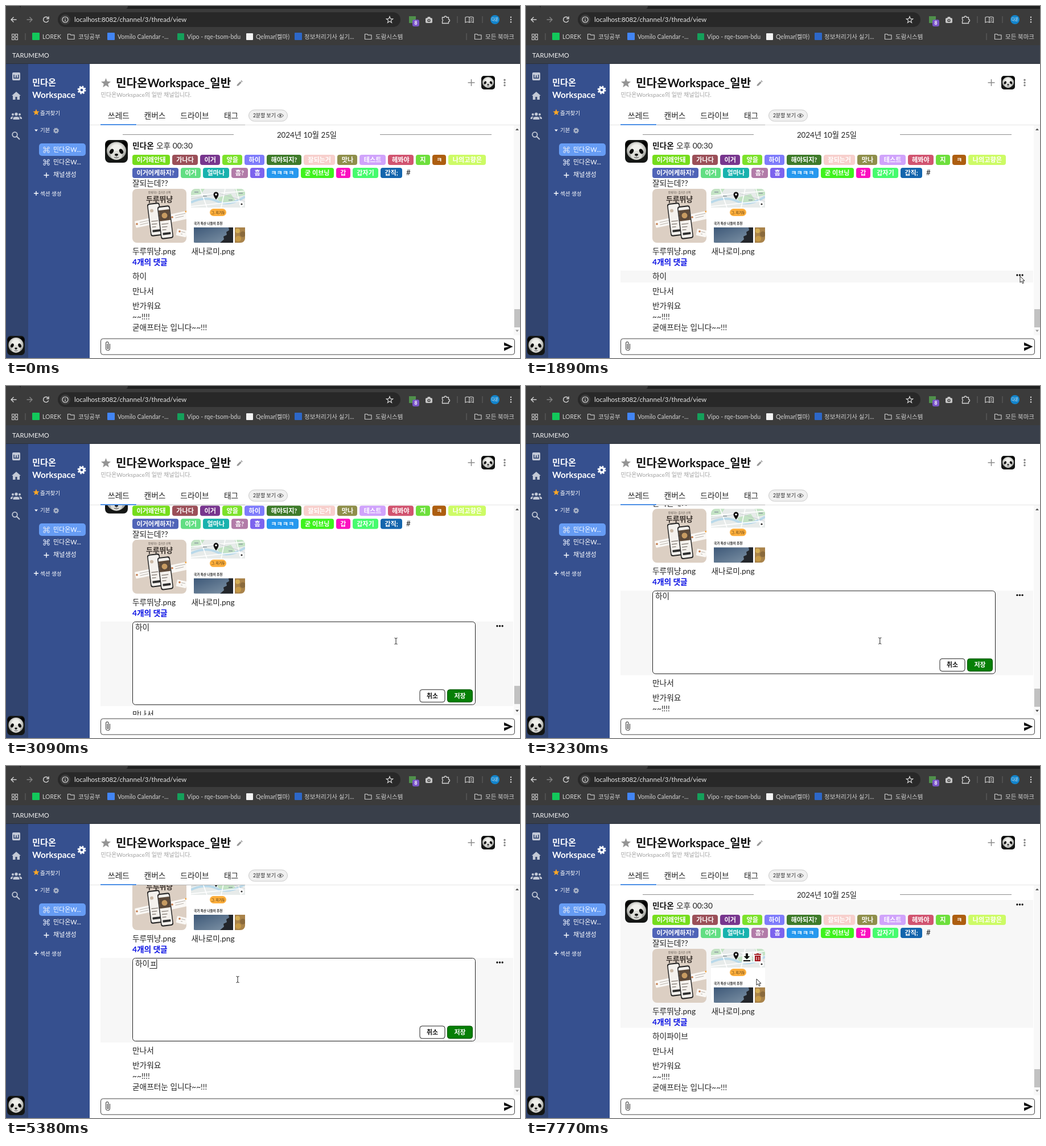
Write an HTML page that moves like this. It is 903 by 620 pixels and loops after 8000 ms.

```html
<!DOCTYPE html>
<html lang="ko">
<head>
<meta charset="utf-8">
<title>Thread edit</title>
<style>
html, body { margin: 0; width: 100%; height: 100%; overflow: hidden; background: #fff; }
svg { display: block; }
text { font-family: Lato, "Noto Sans CJK KR", "Noto Sans CJK", sans-serif; white-space: pre; }
.b { font-weight: 700; }
.m { text-anchor: middle; }
</style>
</head>
<body>
<svg id="stage" width="903" height="620" viewBox="0 0 903 620"></svg>
<script>
const LOOP = 8000;
const USER = '민다온';

// Drawing helpers: text is placed by its vertical centre
const T = (x, y, s, size, fill = '#222', cls = '') =>
  `<text x="${x}" y="${(y + size * .37).toFixed(2)}" font-size="${size}" fill="${fill}" class="${cls}">${s}</text>`;
const R = (x, y, w, h, fill, r = 0, more = '') =>
  `<rect x="${x}" y="${y}" width="${w}" height="${h}" rx="${r}" fill="${fill}" ${more}/>`;
const C = (x, y, r, fill, more = '') => `<circle cx="${x}" cy="${y}" r="${r}" fill="${fill}" ${more}/>`;
const L = (d, stroke, w = 1.3, more = '') =>
  `<path d="${d}" fill="none" stroke="${stroke}" stroke-width="${w}" ${more}/>`;
const F = (d, fill, more = '') => `<path d="${d}" fill="${fill}" ${more}/>`;
const G = (id, body, more = '') => `<g id="${id}" ${more}>${body}</g>`;

const plus = (x, y, r, c, w = 1.4) => L(`M${x - r} ${y}h${2 * r}M${x} ${y - r}v${2 * r}`, c, w);
const dots = (x, y, dx, dy, r, c) => [-1, 0, 1].map(i => C(x + i * dx, y + i * dy, r, c)).join('');
const folder = (x, y) => L(`M${x + .5} ${y - 4.5}h4l1.5 1.7h6v7.3h-11.5z`, '#c7c7c7', 1.2, 'stroke-linejoin="round"');

function star(x, y, r, fill, more) {
  let d = '';
  for (let i = 0; i < 10; i++) {
    const a = i * Math.PI / 5, q = i % 2 ? r * .43 : r;
    d += (i ? 'L' : 'M') + (x + q * Math.sin(a)).toFixed(2) + ' ' + (y - q * Math.cos(a)).toFixed(2);
  }
  return F(d + 'z', fill, more);
}

function gear(x, y, r, c) {
  const tooth = 2 * Math.PI * r / 16;
  return C(x, y, r * .65, 'none', `stroke="${c}" stroke-width="${r * .55}"`) +
    C(x, y, r, 'none', `stroke="${c}" stroke-width="${r * .42}" stroke-dasharray="${tooth}"`);
}

const oval = (x, y, rx, ry, turn, fill) =>
  `<ellipse rx="${rx}" ry="${ry}" fill="${fill}" transform="translate(${x} ${y}) rotate(${turn})"/>`;

const panda = (x, y, w, h = w) =>
  `<svg x="${x}" y="${y}" width="${w}" height="${h}" viewBox="0 0 40 40" preserveAspectRatio="none">` +
  R(0, 0, 40, 40, '#141615', 8) + oval(6, 8, 5, 5.5, 35, '#030303') + oval(34, 8, 5, 5.5, -35, '#030303') +
  oval(20, 19, 17, 15.5, 0, 'url(#fur)') + oval(20, 27, 10, 8, 0, '#dcdcd8') +
  oval(11.5, 20, 3.2, 4.6, 32, '#0c0c0c') + oval(28.5, 20, 3.2, 4.6, -32, '#0c0c0c') +
  oval(20, 26, 3, 1.9, 0, '#111') + L('M20 27v3M16 30.500q4 2 8 0', '#444', 1) + '</svg>';

function browser() {
  const ic = '#d5d5d5', bm = '#d0d0d0', z = 10.5;
  const bar = (x, y) => L(`M${x} ${y - 6}v12`, '#646464', 1);
  return R(0, 0, 903, 70, '#3b3b3b') + R(0, 0, 903, 5, '#1f2020') + F('M0 0h22q4 0 4 5H0zM210 5q4 0 4-5h-188v5z', '#3b3b3b') +
    L('M18.5 24H9M13.5 19.5L9 24l4.5 4.500', ic, 1.4) + L('M36.500 24H46M41.500 19.500L46 24l-4.500 4.500', '#858585', 1.4) +
    L('M74 21a4.700 4.700 0 1 0 .700 4.500M75 18.500v4h-4', ic, 1.4) +
    R(91, 11, 602, 26, '#282828', 13) + C(104, 24, 9, '#3c3c3c') + C(104, 24, 5, 'none', `stroke="${ic}" stroke-width="1.2"`) +
    L('M104 23.500v3.500M104 21v1.300', ic, 1.2) +
    T(120, 24, 'localhost:8082/channel/3/thread/view', 11.5, '#e6e6e6') +
    star(674, 24.5, 6, 'none', `stroke="${ic}" stroke-width="1.2"`) +
    R(708, 18, 12, 12, '#4f8f4b') + R(714, 24, 12, 12, '#7a55c7', 3) + T(720, 30, '8', 8.5, '#fff', 'b m') +
    R(737, 21, 12, 9, '#c4c4c4', 2) + R(740.5, 19, 5, 3, '#c4c4c4', 1) + C(743, 25.5, 2.6, '#3b3b3b') + C(743, 25.5, 1.2, '#c4c4c4') +
    L('M766.500 20h3.500a2 2 0 0 1 4 0h3.500v3.500a2 2 0 0 1 0 4v3h-11v-3.500a2 2 0 0 0 0-3.500z', ic, 1.3) +
    bar(793, 24) + L('M814 20q-3-2-7 0v9q4-2 7 0q3-2 7 0v-9q-4-2-7 0v9M816 22h3M816 25h3', ic, 1.2) + bar(837, 24) +
    C(859, 24, 8, '#1284cc') + T(859, 24, USER.slice(1), 6.5, '#fff', 'm') + dots(887, 24, 0, 4.2, 1.2, ic) +
    [0, 1, 2, 3].map(i => R(10.5 + i % 2 * 6, 49.5 + (i >> 1) * 6, 4, 4, 'none', 0, `stroke="${bm}"`)).join('') +
    bar(34, 54) + R(46, 47, 13, 13, '#12c75b', 1) + T(64, 54, 'LOREK', z, bm) +
    folder(108, 54) + T(127, 54, '코딩공부', z, bm) +
    R(178, 47, 13, 13, '#4285f4', 1) + T(196, 54, 'Vomilo Calendar -...', z, bm) +
    R(301, 48, 12, 12, '#15a05a', 1) + T(318, 54, 'Vipo - rqe-tsom-bdu', z, bm) +
    R(422, 48, 12, 12, '#f2f2f2', 1) + T(439, 54, 'Qelmar(켈마)', z, bm) +
    R(507, 47, 13, 13, '#2d67c8', 1) + T(524, 54, '정보처리기사 실기...', z, bm) +
    folder(630, 54) + T(649, 54, '도람시스템', z, bm) +
    bar(809, 54) + folder(823, 54) + T(842, 54, '모든 북마크', z, bm);
}

function sidebar() {
  const ic = '#c3c9d6', w = '#fff';
  return R(0, 69, 903, 33, '#393f4a') + R(0, 101, 903, 1, '#2c313a') + T(11, 87, 'TARUMEMO', 11.2, '#f3f3f3') +
    R(0, 102, 39, 518, '#31446f') + R(39, 102, 108, 518, '#36508f') +
    R(11, 117, 14, 14, ic, 2) + L('M14 121v6h8v-6M18 122v5', '#31446f', 1.5) +
    F('M18 151l8 7h-2v7h-4.500v-5h-3v5H12v-7h-2z', ic) +
    C(18, 190.500, 2.700, ic) + C(12, 191, 2, ic) + C(24, 191, 2, ic) +
    F('M12.500 200v-2q0-3 5.500-3t5.500 3v2zM8 199v-2q1-3 5-2.500q-2 1.500-2 4.500zM28 199v-2q-1-3-5-2.500q2 1.500 2 4.500z', ic) +
    C(15.500, 226.500, 4.300, 'none', `stroke="${ic}" stroke-width="1.800"`) + L('M18.500 229.500l5.500 5.500', ic, 2) +
    panda(2, 581, 31, 34) +
    T(46, 134, USER, 15.2, w, 'b') + T(46, 156, 'Workspace', 15.2, w, 'b') + gear(133, 148, 6.2, w) +
    star(53, 187.5, 6, '#ffa825') + T(60, 188, '즐겨찾기', 9.5, w) +
    F('M50 217.500h6l-3 3.500z', w) + T(60, 219, '기본', 9.4, w) + gear(88, 219.5, 4.2, '#aab3c6') +
    R(58, 242, 82, 22, '#669cf4', 5) +
    [253, 275].map(y => `<text x="71" y="${y + 5.5}" font-size="15" class="m" fill="#d9e2f5" style="font-family:'DejaVu Sans',sans-serif">⌘</text>` +
      T(83, y, USER + 'W...', 11, w)).join('') +
    plus(71, 298, 4.5, w) + T(83, 297, '채널생성', 11.1, w) +
    plus(53, 330, 4, w) + T(60, 330, '섹션 생성', 9.5, w);
}

function header() {
  const tabs = [['쓰레드', 198], ['캔버스', 261.5], ['드라이브', 331.5], ['태그', 395.5]];
  return star(175.5, 136, 9, '#959595') + T(193, 136, USER + 'Workspace_일반', 20.1, '#111', 'b') +
    F('M405.500 141l.5-2.800 5.500-5.500 2.300 2.300-5.500 5.500zM412.300 132l1.200-1.200 2.300 2.300-1.200 1.200z', '#999') +
    T(166.5, 156.5, USER + 'Workspace의 일반 채널입니다.', 10.1, '#a0a0a0') +
    plus(817.5, 135, 6, '#8b8b8b', 1.5) + panda(835, 123, 24) + dots(876, 135, 0, 4.8, 1.7, '#858585') +
    tabs.map(([s, x]) => T(x, 193, s, 13.7, '#222', 'm')).join('') +
    R(147, 209, 756, 1, '#e6e6e6') + R(230, 209, 190, 1, '#b5b5b5') + R(166, 208, 63, 2, '#4d90e6') +
    R(426.5, 183, 68, 20, '#f0f0f0', 10, 'stroke="#c9c9c9"') + T(434, 193, '2분할 보기', 8.8) +
    L('M476.500 193q5.500-6.500 11 0q-5.500 6.500-11 0z', '#555', 1) + C(482, 193, 1.7, '#555');
}

const TAGS = [
  ['이거왜안돼 76dd1c,가나다 9b4f58,이거 78368e,양을 7ce22a,하이 7f7cfb,해야되지? 3e7b2a,잘되는거 f7cfcc,맛나 8f8f4b,테스트 d0a3fb,헤봐야 d15470,지 6ddf3c,ㅋ ad5e10,나의고향은 cdfb66', 262],
  ['이거어케하지? 5064b8,이거 62de83,얼마나 18b2ae,흠? b27ba8,흠 7c63ee,ㅋㅋㅋㅋ 2698ee,굳_이브닝 3ef31d,갑 fb10c0,갑자기 46fb6e,갑직; 1365ad', 285]
];
function tagRow([list, y]) {
  let x = 222, out = '';
  for (const item of list.split(',')) {
    const [s, c] = item.split(' ');
    let w = 14.4;
    for (const ch of s) w += ch === '?' ? 5 : ch === ';' || ch === '_' ? 3 : 10.3;
    const left = Math.round(x), right = Math.round(x + w);
    out += R(left, y, right - left, 18, '#' + c, 4) + T(x + w / 2, y + 9, s.replace('_', ' '), 11.1, '#fff', 'b m');
    x += w + 4;
  }
  return out;
}

function phone(x, y, turn, photo) {
  return `<g transform="translate(${x} ${y}) rotate(${turn})">` + R(-11, -29, 22, 58, '#262626', 4) +
    R(-9.5, -27, 19, 54, '#f4f1ed', 3) + (photo ? R(-9.5, -22, 19, 19, '#5d4a3a') + C(0, -12, 5, '#c79b62') : C(-4, -16, 3, '#cbb9a6')) +
    [2, 7, 12].map(k => R(-7, k, 13 - k / 2, 1.5, '#8f8780')).join('') + R(-7, 18, 14, 4, '#2f2f2f', 1) + '</g>';
}
const card = (x, y, w, h, turn) => R(x, y, w, h, '#faf8f5', 1.5, `transform="rotate(${turn} ${x} ${y})"`) +
  C(x + 4, y + 5, 1.8, '#c47b4c') + L(`M${x + 8} ${y + 4}h${w - 11}M${x + 8} ${y + 8}h${w - 15}`, '#b8b2ab', 1, `transform="rotate(${turn} ${x} ${y})"`);

function poster() {
  return R(222, 322, 95, 95, '#dccfc3', 8) +
    `<g clip-path="url(#posterClip)">` + T(269.5, 328.5, '함께하는 즐거운 산책', 4.5, '#5e554e', 'm') +
    T(269.5, 340, '두루뛰냥', 12.8, '#38302b', 'b m') +
    card(226, 379, 30, 12, -12) + card(288, 367, 30, 14, -12) + card(301, 392, 18, 12, 12) +
    phone(262, 376, -7) + phone(280, 381, -7, true) + C(316, 362, 1.5, '#f0a13a') + '</g>';
}

function mapCard() {
  return R(325, 322, 95, 95, '#fff', 8) + `<g clip-path="url(#mapClip)">` + R(325, 322, 95, 33, '#e7ebea') +
    F('M325 322h24l-6 9-18 5zM371 338l24-7 8 12-25 7zM402 322h18v11l-14 3z', '#c3e3c4') +
    L('M325 346q25-12 46-2t49-8', '#b9d9ea', 4) +
    L('M325 334l95-8M341 322l12 33M385 322l-7 33M325 353l95-10M404 322l9 33', '#fff', 1.6) +
    L('M325 340l50-10 45 14', '#b9bfc4', .7) +
    [331, 346, 391, 409].map((x, i) => R(x, 327 + i * 7 % 19, 7, 1.5, '#8c9aa0')).join('') +
    C(414, 349, 4, '#fff') + C(414, 349, 1.6, '#333') +
    F('M369 341q-4.500-6-4.500-9a4.500 4.500 0 0 1 9 0q0 3-4.500 9z', '#111') + C(369, 332, 1.7, '#fff') +
    R(358, 357, 29, 13, '#fcae3c', 6.5) + T(372.5, 363.5, '그. 지기듀', 5.8, '#3b2a10', 'm') +
    T(330, 383, '국가 특산 나들이 추천', 5.6, '#222', 'b') +
    R(330, 390, 69, 27, 'url(#sky)') + F('M399 390h-8l1 5-5 3 1 5-6 3 1 5-7 6h23z', '#23262b') +
    R(402, 390, 18, 27, '#a9834a') + C(407, 396, 4, '#d3ad55') + C(416, 402, 5, '#8a6a3c') + C(408, 410, 5, '#c69a48') +
    '</g>';
}

function thread() {
  const z = 13.7, line = (y, s) => T(222, y, s, z);
  return R(205, 226, 195, 1, '#8d8d8d') + R(657, 226, 196, 1, '#8d8d8d') + T(528.5, 227, '2024년 10월 25일', 13.3, '#222', 'm') +
    G('hover', R(166, 0, 725, 1, '#f7f7f7') + `<g id="more">${dots(867.5, 0, 4.6, 0, 1.7, '#111')}</g>`) +
    panda(174, 236, 40) + T(222, 246, USER, z, '#111', 'b') + T(264, 246, '오후 00:30', z) +
    TAGS.map(tagRow).join('') + T(703, 293, '#', 13.5) + line(312, '잘되는데??') +
    poster() + mapCard() +
    G('tools', R(380, 328, 17, 18, '#fff', 2, 'opacity=".7"') + R(399, 328, 17, 18, '#fff', 2, 'opacity=".7"') +
      F('M386 330h4v5h3.500l-5.500 5.500-5.500-5.500h3.500zM382 342h12v2h-12z', '#111') +
      F('M401 331h3.500l1-1h3l1 1h3.500v1.700h-12zM402 334h10v10h-10z', '#a3171d') + L('M405 336v6M409 336v6', '#fff', 1)) +
    line(432, '두루뛰냥.png') + T(325.5, 432, '새나로미.png', z) + T(222, 451, '4개의 댓글', z, '#0b12e4', 'b') +
    G('plain', `<text id="msg" x="222" y="481.100" font-size="${z}" fill="#222"></text>`) +
    G('editor', R(222.5, 466.5, 602, 146, '#fff', 5, 'stroke="#222"') +
      `<text id="draft" x="227" y="481.100" font-size="${z}" fill="#222"></text>` +
      R(0, 484, 12.6, 1, '#222', 0, 'id="under"') + R(0, 468, 1, 17, '#111', 0, 'id="caret"') +
      R(727, 586, 44, 22, '#fff', 4, 'stroke="#222"') + T(749, 597, '취소', 10.9, '#111', 'b m') +
      R(775.5, 586, 44, 22, '#067f06', 4, 'stroke="#045004"') + T(797.5, 597, '저장', 10.9, '#fff', 'b m')) +
    G('lower', line(502, '만나서') + line(528, '반가워요') + line(547, '~~!!!!') + line(566, '굳애프터눈 입니다~~!!!'));
}

function overlay() {
  const items = ['댓글 쓰기', '태그 추가', '수정', '삭제'];
  return R(892, 210, 11, 370, '#f8f8f8') + F('M895 219l3-3.500 3 3.500z', '#555') + F('M895 570.500l3 3.500 3-3.500z', '#999', 'id="down"') +
    R(893, 0, 10, 32, '#c1c1c1', 0, 'id="thumb"') +
    R(166.5, 586, 727, 28, '#fff', 4, 'stroke="#444"') +
    L('M182.500 595v8a3.500 3.500 0 0 1-7 0v-9a2.300 2.300 0 0 1 4.600 0v8.500a1 1 0 0 1-2.100 0v-7.500', '#555', 1.2) +
    F('M875 592.500l15.500 7.500-15.500 7.500v-5.500l9-2-9-2z', '#111') +
    G('menu', R(784.5, 378.5, 67, 109, '#fff', 4, 'stroke="#ccc"') + R(789, 435, 58, 23, '#f6f6f6', 4, 'id="pick"') +
      items.map((s, i) => T(818, 394 + 26.1 * i, s, 13.7, '#222', 'm')).join('')) +
    G('arrow', F('M0 0v11l2.600-2.300 1.800 4 1.900-.9-1.800-3.800h3.500z', '#fff', 'stroke="#111" stroke-width=".9"')) +
    G('beam', L('M-2.500-5.500q2.500 0 2.500 1.500v8q0 1.500-2.500 1.500M2.500-5.500q-2.500 0-2.500 1.500M0 4q0 1.500 2.500 1.500', '#222', 1));
}

document.getElementById('stage').innerHTML =
  '<defs><clipPath id="pane"><rect x="147" y="210" width="745" height="370"/></clipPath>' +
  '<clipPath id="posterClip"><rect x="222" y="322" width="95" height="95" rx="8"/></clipPath>' +
  '<clipPath id="mapClip"><rect x="325" y="322" width="95" height="95" rx="8"/></clipPath>' +
  '<radialGradient id="fur" cy=".4"><stop offset=".5" stop-color="#f0f0ec"/><stop offset="1" stop-color="#a9aaa6"/></radialGradient>' +
  '<linearGradient id="sky" x2="1" y2="1"><stop stop-color="#3d5878"/><stop offset="1" stop-color="#8296a8"/></linearGradient></defs>' +
  R(0, 0, 903, 620, '#fff') + browser() + sidebar() + header() +
  `<g clip-path="url(#pane)">${G('scroll', thread())}</g>` + overlay();

const el = {};
document.querySelectorAll('[id]').forEach(e => el[e.id] = e);
const bg = el.hover.firstChild;
const show = (e, on) => e.setAttribute('display', on ? 'inline' : 'none');
const move = (e, x, y) => e.setAttribute('transform', `translate(${x} ${y})`);

const PATH = [[400, 846, 573], [1160, 821, 459], [1220, 821, 459], [1850, 868, 476], [2220, 868, 476], [2430, 821, 447],
  [2630, 821, 447], [2700, 819, 449], [2800, 815, 450], [3230, 623, 449], [3380, 441, 431], [3930, 407, 376], [7600, 407, 376], [7630, 405, 375]];
const SCROLL = [[2960, 0], [3230, 105.5], [3380, 128]];
const TYPED = [[0, ''], [5380, 'ㅍ'], [5475, '파'], [5570, '파이'], [5830, '파입'], [6160, '파이'], [6300, '파'], [6430, ''],
  [6570, 'ㅍ'], [6700, '파'], [6840, '팡'], [6935, '파이'], [7030, '파입'], [7170, '파이브']];

function along(keys, t, k) {
  if (t <= keys[0][0]) return keys[0][k];
  for (let i = 1; i < keys.length; i++) {
    const a = keys[i - 1], b = keys[i];
    if (t < b[0]) return a[k] + (b[k] - a[k]) * (t - a[0]) / (b[0] - a[0]);
  }
  return keys[keys.length - 1][k];
}

function draw(t) {
  const edit = t >= 2760 && t < 7630, menu = t >= 1960 && t < 2760;
  const s = edit ? along(SCROLL, t, 1) : 0, grow = edit ? 127 : 0;
  const x = along(PATH, t, 1), y = along(PATH, t, 2);

  move(el.scroll, 0, -s);
  move(el.lower, 0, grow);
  show(el.plain, !edit);
  show(el.editor, edit);
  el.msg.textContent = t >= 7770 ? '하이파이브' : '하이';

  const rows = [[236, 225], [466, edit ? 149 : 21], [492 + grow, 21], [518 + grow, 59]];
  const row = menu ? rows[1] : rows.find(([top, h]) => y + s >= top && y + s < top + h);
  const hover = t >= 400 && !!row;
  show(el.hover, hover);
  if (hover) {
    bg.setAttribute('y', row[0]);
    bg.setAttribute('height', row[1]);
    move(el.more, 0, row[0] + 8);
  }

  const typed = TYPED.filter(k => k[0] <= t).pop()[1];
  const end = 227 + 12.6 * (2 + typed.length);
  el.draft.textContent = '하이' + typed;
  el.under.setAttribute('x', end - 12.6);
  el.caret.setAttribute('x', end - .5);
  show(el.under, typed);
  show(el.caret, t >= 3790 && (t < 4320 || t >= 4850));

  show(el.menu, menu);
  show(el.pick, t >= 2360);
  show(el.tools, t >= 7630);
  el.thumb.setAttribute('y', edit ? 523.6 + s * .089 : 534);
  el.down.setAttribute('fill', edit && s < 128 ? '#444' : '#999');

  const inBox = edit && x < 825 && y + s > 466;
  show(el.arrow, t >= 400 && !inBox);
  show(el.beam, inBox);
  move(el.arrow, x, y);
  move(el.beam, x, y);
}

const start = performance.now();
function tick(now) {
  draw(Math.max(0, now - start) % LOOP);
  requestAnimationFrame(tick);
}
draw(0);
requestAnimationFrame(tick);
</script>
</body>
</html>
```
